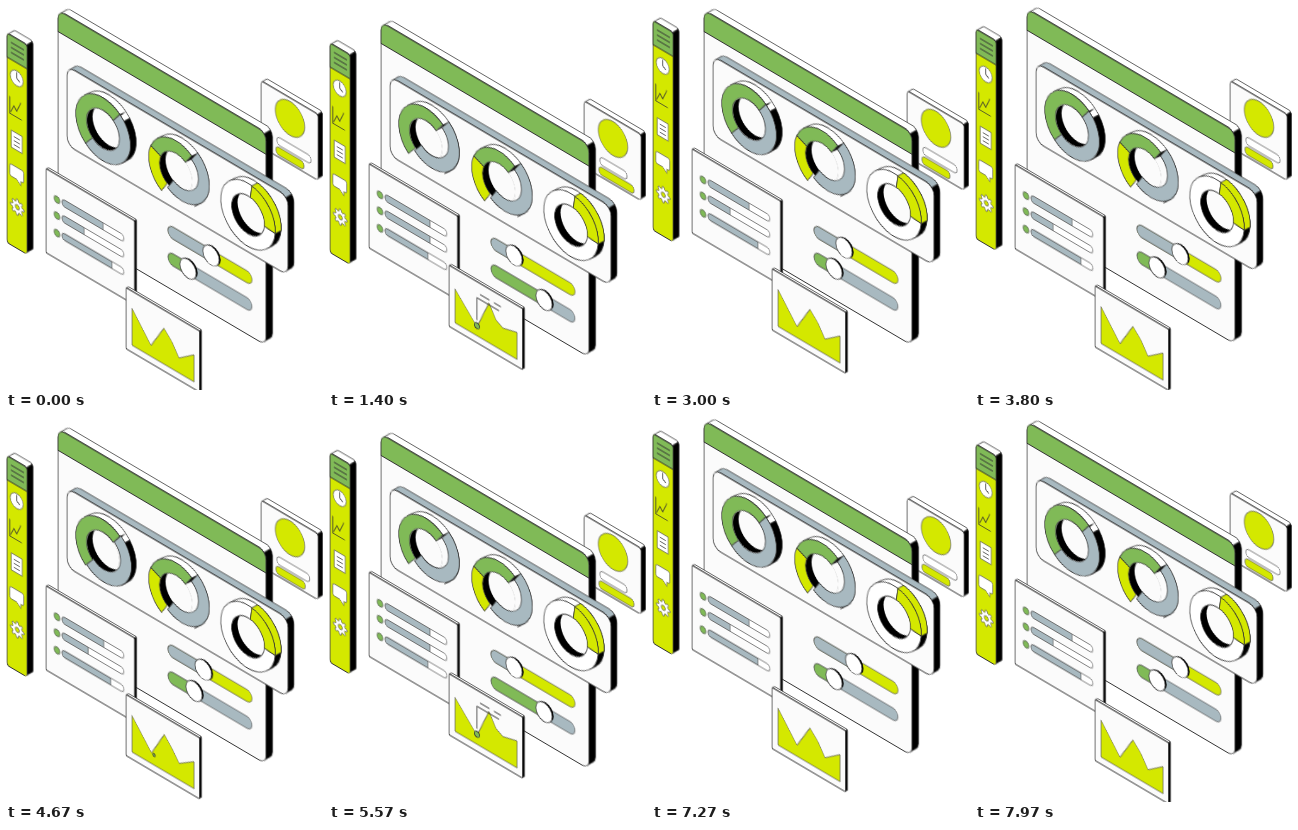
An HTML page for the animation above (8.01 s loop, 317 by 384 pixels).

```html
<!DOCTYPE html>
<html lang="en">
<head>
<meta charset="utf-8">
<title>Floating dashboard</title>
<style>
  html, body { margin: 0; width: 100%; height: 100%; overflow: hidden; background: #fff; }
  svg { display: block; width: 100%; height: 100%; }
  svg * { vector-effect: non-scaling-stroke; }

  .ink { stroke: #333; stroke-width: .7; stroke-linejoin: round; }
  .thin { stroke: #555; stroke-width: .6; stroke-linejoin: round; }
  .line { fill: none; stroke: #333; stroke-width: .8; }
  .white { fill: #fff; }
  .paper { fill: #fbfbfb; }
  .black { fill: #000; }
  .green { fill: #80ba57; }
  .lime { fill: #d4e800; }
  .gray { fill: #a8b9c0; }
  .none { fill: none; }

  /* Half a sine period, played back and forth */
  .float { animation: float 2002.5ms cubic-bezier(.3642, 0, .6358, 1) infinite alternate; }
  @keyframes float {
    from { transform: translateY(var(--amp)); }
    to { transform: translateY(calc(var(--amp) * -1)); }
  }

  .slide, .grow, .sink, .hill, .callout, .marker {
    animation: 4005ms cubic-bezier(.45, 0, .4, 1) infinite;
  }
  .slide { animation-name: slide; }
  .grow { animation-name: grow; }
  .slow.slide { animation-name: slide-slow; }
  .slow.grow { animation-name: grow-slow; }
  .sink { animation-name: sink; }
  .hill { animation-name: hill; }
  .callout { animation-name: callout; stroke-dasharray: 1 2; }
  .marker { animation-name: marker; transform-box: fill-box; transform-origin: center; }

  @keyframes slide {
    0%, 10%, 65%, 100% { transform: translateX(var(--from)); }
    33.7%, 41% { transform: translateX(var(--to)); }
  }
  @keyframes grow {
    0%, 10%, 65%, 100% { width: var(--from); }
    33.7%, 41% { width: var(--to); }
  }
  @keyframes slide-slow {
    0%, 7.5%, 90%, 100% { transform: translateX(var(--from)); }
    31%, 66% { transform: translateX(var(--to)); }
  }
  @keyframes grow-slow {
    0%, 7.5%, 90%, 100% { width: var(--from); }
    31%, 66% { width: var(--to); }
  }
  @keyframes sink {
    0%, 10%, 65%, 100% { transform: none; }
    33.7%, 41% { transform: translate(6px, -6.5px); }
  }
  @keyframes hill {
    0%, 10%, 65%, 100% { d: path("M6 17L25 43L38 18L46 27L53 39L68 27V54H6Z"); }
    33.7%, 41% { d: path("M6 20L28 45L40 14L47 27L54 31L68 27V54H6Z"); }
  }
  @keyframes callout {
    0%, 15%, 65%, 100% { stroke-dashoffset: 1.02; }
    34%, 50% { stroke-dashoffset: 0; }
  }
  @keyframes marker {
    0%, 10%, 52%, 100% { transform: scale(0); }
    25%, 41% { transform: scale(1); }
  }
</style>
</head>
<body>
<svg id="stage" viewBox="0 0 317 384"></svg>
<script>
const NS = 'http://www.w3.org/2000/svg';
const PERIOD = 4005, SLOPE = .59, SQUASH = .866;
const stage = document.getElementById('stage');

function add(parent, tag, cls, attrs = {}) {
  const el = document.createElementNS(NS, tag);
  if (cls) el.setAttribute('class', cls);
  for (const key in attrs) el.setAttribute(key, attrs[key]);
  return parent.appendChild(el);
}
const path = (parent, cls, d) => add(parent, 'path', cls, { d });
const rect = (parent, cls, x, y, width, height, rx = 0, ry = rx) =>
  add(parent, 'rect', cls, { x, y, width, height, rx, ry });
const disc = (parent, cls, cx, cy, r) =>
  add(parent, 'ellipse', cls, { cx, cy, rx: r * SQUASH, ry: r });

function vary(el, from, to) {
  el.style.setProperty('--from', from + 'px');
  el.style.setProperty('--to', to + 'px');
  return el;
}

function clip(parent, id, x, y, w, h, rx, ry) {
  rect(add(parent, 'clipPath', '', { id }), '', x, y, w, h, rx, ry);
  return `url(#${id})`;
}

// Slab standing on the left isometric plane; children use its skewed coordinates
function panel({ x, y, w, h, r, depth, amp, peak, top = 'white', face = 'paper' }) {
  const float = add(stage, 'g', 'float');
  float.style.setProperty('--amp', amp + 'px');
  float.style.animationDelay = (peak / 360 - 1) * PERIOD + 'ms';
  const g = add(float, 'g', '', { transform: `matrix(1 ${SLOPE} 0 1 ${x} ${y})` });
  const rx = r * SQUASH, a = rx * .293, b = r * .293;
  const dx = depth, dy = -2 * SLOPE * depth;
  const arc = (sweep, px, py) => `A${rx} ${r} 0 0 ${sweep} ${px} ${py}`;
  path(g, top + ' ink', `M${a} ${b}${arc(1, rx, 0)}H${w - rx}${arc(1, w - a, b)}l${dx} ${dy}`
    + `${arc(0, w - rx + dx, dy)}H${rx + dx}${arc(0, a + dx, b + dy)}Z`);
  path(g, 'black ink', `M${w - a} ${b}${arc(1, w, r)}V${h - r}${arc(1, w - a, h - b)}l${dx} ${dy}`
    + `${arc(0, w + dx, h - r + dy)}V${r + dy}${arc(0, w - a + dx, b + dy)}Z`);
  rect(g, face + ' ink', 0, 0, w, h, rx, r);
  return g;
}

// Coloured band across the top of a panel
function header(g, w, height, r) {
  const rx = r * SQUASH;
  path(g, 'green ink', `M0 ${height}V${r}A${rx} ${r} 0 0 1 ${rx} 0H${w - rx}`
    + `A${rx} ${r} 0 0 1 ${w} ${r}V${height}Z`);
}

// Thick ring; a part may have its own wall colour, lie sunk, or sink over time
function donut(g, cx, cy, parts) {
  const R = 31.5, r = 19, dx = 6, dy = -6.5;
  const at = (deg, rad, ox = 0, oy = 0) => {
    const t = deg * Math.PI / 180;
    return `${cx + ox + rad * SQUASH * Math.cos(t)} ${cy + oy + rad * Math.sin(t)}`;
  };
  const arc = (rad, big, sweep, end) => `A${rad * SQUASH} ${rad} 0 ${big} ${sweep} ${end}`;
  const wall = (cls, a, b) => path(g, cls + ' ink', `M${at(a, R)}${arc(R, 0, 1, at(b, R))}`
    + `L${at(b, R, dx, dy)}${arc(R, 0, 0, at(a, R, dx, dy))}Z`);
  const face = (parent, { fill, a, b }) => {
    const big = b - a > 180 ? 1 : 0;
    return path(parent, fill + ' ink', `M${at(a, R)}${arc(R, big, 1, at(b, R))}`
      + `L${at(b, r)}${arc(r, big, 0, at(a, r))}Z`);
  };

  wall('white', -133, -40);
  wall('black', -40, 47);
  for (const part of parts)
    if (part.wall) wall(part.wall, part.a, part.b);

  const hole = clip(g, 'hole' + cx, cx - r * SQUASH, cy - r, 2 * r * SQUASH, 2 * r, r * SQUASH, r);
  const inner = add(g, 'g', '', { 'clip-path': hole });
  disc(inner, 'black', cx, cy, r);
  disc(inner, 'paper', cx + dx, cy + dy, r);

  for (const part of parts.filter(p => p.low)) {
    path(g, 'black', `M${at(part.a, R)}L${at(part.a, r)}L${at(part.a, r, dx, dy)}L${at(part.a, R, dx, dy)}Z`);
    const low = add(g, 'g', part.low === 'moving' ? 'sink' : '');
    if (part.low === 'fixed') low.setAttribute('transform', `translate(${dx} ${dy})`);
    face(low, part);
  }
  for (const part of parts.filter(p => !p.low)) face(g, part);
}

function profileCard() {
  const g = panel({ x: 255, y: 86.5, w: 57, h: 66, r: 3, depth: 4.5, amp: 11.9, peak: 171 });
  disc(g, 'lime thin', 29, 20.5, 17);
  vary(rect(g, 'white thin grow', 16, 46, 34, 8, 3.5, 4), 34, 27);
  vary(rect(g, 'lime thin grow', 15, 56, 28, 8, 3.5, 4), 28, 35);
}

function slider(g, y, left, right, from, to, slow) {
  rect(g, right + ' thin', 110, y - 6, 84, 12, 5, 6);
  vary(rect(g, left + ' thin grow' + slow, 110, y - 6, from - 110, 12, 5, 6), from - 106, to - 106);
  const knob = vary(add(g, 'g', 'slide' + slow), from, to);
  disc(knob, 'black', 1.5, y - 1.2, 9.5);
  disc(knob, 'white ink', 0, y, 9.5);
}

function mainWindow() {
  const g = panel({ x: 52, y: 9, w: 208, h: 212.5, r: 8, depth: 6.5, amp: 7, peak: 135 });
  header(g, 208, 21.5, 8);
  slider(g, 155.2, 'gray', 'lime', 153, 133, ' slow');
  slider(g, 182, 'green', 'gray', 130, 163, '');
}

function donutPanel() {
  const g = panel({ x: 61, y: 61, w: 221, h: 79, r: 9, depth: 6, amp: 11, peak: 95, top: 'gray' });
  donut(g, 36, 42, [
    { fill: 'green', a: 130, b: 308 },
    { fill: 'gray', a: -52, b: 130, low: 'moving' },
  ]);
  donut(g, 109, 42, [
    { fill: 'green', a: 202, b: 305 },
    { fill: 'lime', a: 122, b: 202 },
    { fill: 'gray', a: -55, b: 122, low: 'fixed' },
  ]);
  donut(g, 181, 42, [
    { fill: 'white', a: 5, b: 278 },
    { fill: 'lime', a: -82, b: 5, wall: 'lime' },
  ]);
}

function listPanel() {
  const g = panel({ x: 40, y: 154, w: 88.5, h: 84, r: 1, depth: 2, amp: 14, peak: 52 });
  const rows = [{ y: 24, from: 41, to: 45 }, { y: 40, from: 22, to: 45 }, { y: 57.5, from: 50, to: 43 }];
  rows.forEach(({ y, from, to }, i) => {
    disc(g, 'green thin', 11, y + .5, 3.4);
    rect(g, 'white', 16, y - 3.5, 62, 7, 3, 3.5);
    const shape = clip(g, 'bar' + i, 16, y - 3.5, 62, 7, 3, 3.5);
    const bar = add(g, 'g', '', { 'clip-path': shape });
    vary(rect(bar, 'gray thin grow', 16, y - 3.5, from, 7), from, to);
    rect(g, 'none thin', 16, y - 3.5, 62, 7, 3, 3.5);
  });
}

function chartCard() {
  const g = panel({ x: 120, y: 266, w: 73.5, h: 61, r: 1, depth: 2, amp: 16, peak: 11 });
  path(g, 'lime thin hill', 'M6 17L25 43L38 18L46 27L53 39L68 27V54H6Z');
  for (const d of ['M50 16H28V42', 'M31 11H42', 'M45 11H53'])
    path(g, 'line thin callout', d).setAttribute('pathLength', 1);
  disc(g, 'green ink marker', 28, 44, 3);
}

function gear(g, cx, cy) {
  const points = [];
  for (let i = 0; i < 32; i++) {
    const t = (i - .5) * Math.PI / 16, r = i % 4 < 2 ? 8 : 5.6;
    points.push(`${cx + r * SQUASH * Math.cos(t)} ${cy + r * Math.sin(t)}`);
  }
  path(g, 'white thin', 'M' + points.join('L') + 'Z');
  disc(g, 'lime thin', cx, cy, 2.4);
}

function sidebar() {
  const g = panel({ x: 1, y: 27, w: 20, h: 209.5, r: 3, depth: 6, amp: 12.4, peak: 90, face: 'lime' });
  header(g, 20, 24, 3);
  path(g, 'line', 'M4 7H17M4 12H17M4 17H17');
  const icons = add(g, 'g', '', { transform: 'translate(.8 -.4)' });
  disc(icons, 'white thin', 9, 40, 7.5);
  path(icons, 'line thin', 'M9 34V40L12 42');
  path(icons, 'line thin', 'M2 62V79H14M3 77L6 69L9 73L13 62');
  rect(icons, 'white thin', 3.5, 95, 11, 17);
  path(icons, 'line thin', 'M6 100H12M6 104H12M6 108H12');
  path(icons, 'white thin', 'M4 129H14Q16 129 16 131V139Q16 141 14 141H13V145L9 141H4Q2 141 2 139V131Q2 129 4 129Z');
  gear(icons, 9.5, 168.5);
}

profileCard();
mainWindow();
donutPanel();
listPanel();
chartCard();
sidebar();
</script>
</body>
</html>
```
